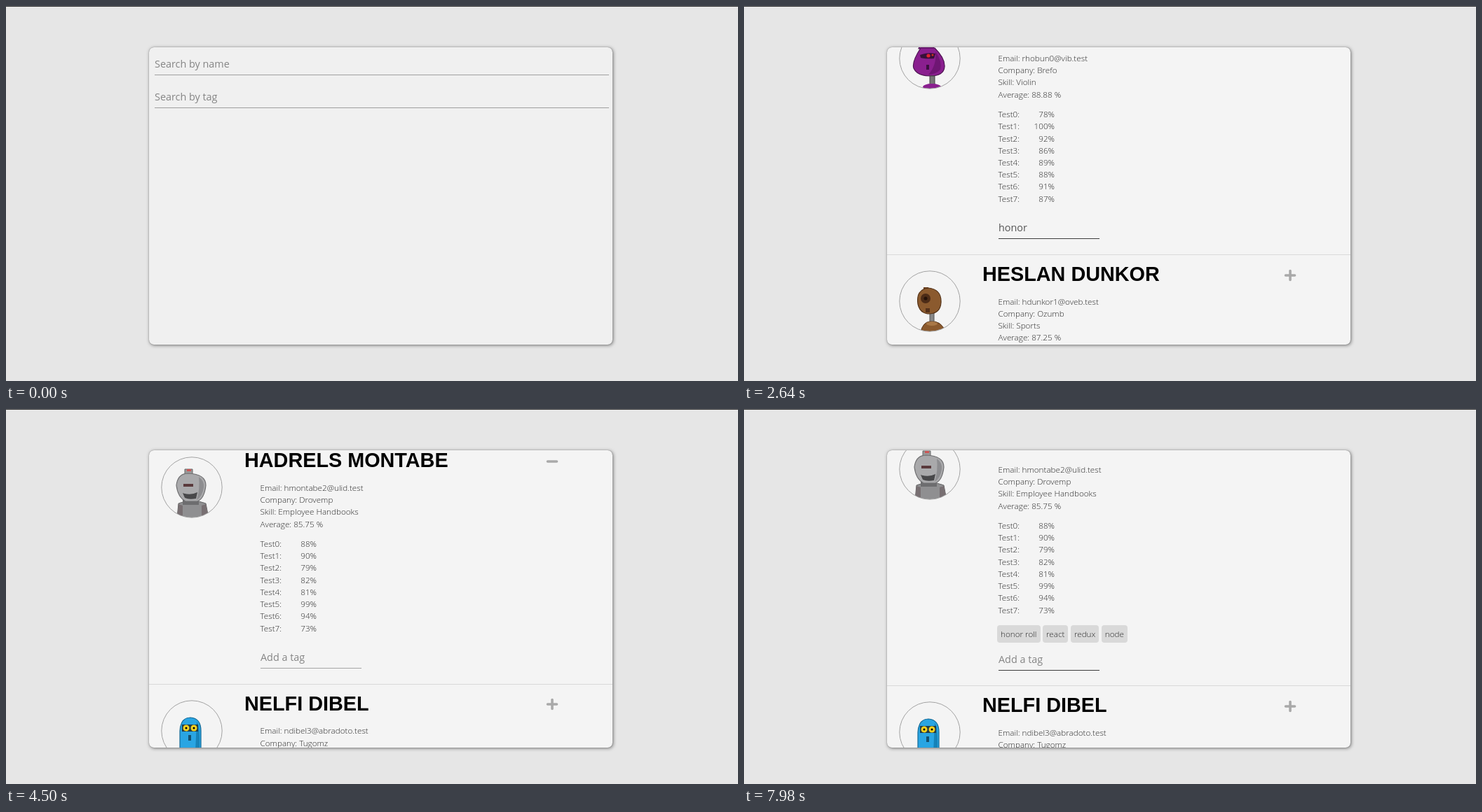
Recreate the animation shown at these times as an HTML page. Size 1044 by 536 pixels, loop 8 s.

```html
<!DOCTYPE html>
<html lang="en">
<head>
<meta charset="utf-8">
<title>Student search</title>
<style>
  html, body { margin: 0; width: 100%; height: 100%; overflow: hidden; background: #e6e6e6; }
  body { position: relative; font: 300 11.7px/17.2px "Open Sans", sans-serif; color: #2b2b2b; }
  #topline { position: absolute; top: 0; left: 0; right: 0; height: 1px; background: #333; }
  #panel { position: absolute; left: 204px; top: 59px; width: 660.5px; height: 424.5px;
    border-radius: 7px; overflow: hidden;
    box-shadow: 0 0 1px rgba(0,0,0,.45), 1px 1px 5px rgba(0,0,0,.5); }
  #page { position: absolute; inset: 0 0 auto; }
  #cards { position: absolute; top: 91.5px; left: 0; width: 100%; }
  .field { position: absolute; height: 31px; box-sizing: border-box; border-bottom: 1px solid #a0a0a0;
    font-size: 14.4px; font-weight: 400; line-height: 30px; white-space: pre; color: #555; }
  .field span { color: #858585; }
  .search { left: 8px; width: 648px; }
  .caret { position: absolute; top: 6px; width: 1px; height: 18px; background: #333; }
  .card { position: relative; box-shadow: 0 1px #d9d9d9; }
  .card > * { position: absolute; }
  .avatar { left: 16.5px; top: 23px; width: 88px; height: 88px; }
  h1 { left: 136px; top: 12px; margin: 0; color: #000; white-space: nowrap;
    font: bold 28.8px/33px "Liberation Sans", Arial, sans-serif; }
  .icon { left: 566px; top: 20.5px; width: 18px; height: 18px; }
  .info { left: 158.5px; top: 58.5px; white-space: pre; }
  .tests { left: 158.5px; top: 138.7px; width: 80.5px; }
  .tests div { display: flex; justify-content: space-between; }
  .tags { left: 157px; top: 289.5px; display: flex; gap: 3.5px; }
  .tags b { font-weight: 300; line-height: 25px; padding: 0 5px; border-radius: 4px; background: #d9d9d9; }
  .card .field { left: 159px; width: 143.5px; }
</style>
</head>
<body>
<svg width="0" height="0" style="position:absolute"><clipPath id="disc"><circle r="43"/></clipPath></svg>
<div id="topline"></div>
<div id="panel"><div id="page">
  <div class="field search" style="top:9px"><span>Search by name</span></div>
  <div class="field search" style="top:56px"><span>Search by tag</span></div>
  <div id="cards"></div>
</div></div>
<script>
const LOOP = 8000, STEP = 60;
const CLOSED = 137.4, OPEN = 347.5, TAG_ROW = 28.5;

const robots = {
  purple: `
    <g fill="#8a1f8f" stroke="#4d1552" stroke-width="1.2">
      <path d="M-10-27h10v8h-10zM-14-19h18l2 5h-22z"/>
      <path d="M-13-15Q-26 5-23 14Q-18 25 0 25Q20 25 21 12Q22 0 7-15Z"/>
    </g>
    <path d="M8-10Q18 4 15 16Q8 23-2 23Q10 10 8-10Z" fill="#6f1674"/>
    <path d="M-14-5Q-4-9 8-7L6 0Q-4 1-13-1Z" fill="#371039"/>
    <circle cx="-2" cy="-4" r="2.6" fill="#e3222f"/><circle cx="4" cy="-5" r="1.5" fill="#c32"/>
    <path d="M-5 9h4v7h-4z" fill="#3c1040"/>
    <path d="M0 25h7v13h-7z" fill="#777" stroke="#444"/>
    <ellipse cx="3" cy="41" rx="13" ry="5" fill="#8a1f8f"/>`,
  brown: `
    <path d="M-9-20h7v7h-7z" fill="#6b4020"/>
    <path d="M0 14h6v18h-6z" fill="#888" stroke="#555"/>
    <path d="M-2-19Q17-17 16 2Q15 17 0 18Q-14 18-17 4Q-20-17-2-19Z" fill="#8b5a2e" stroke="#55341a" stroke-width="1.2"/>
    <circle cx="-6" cy="-4" r="7" fill="#4d2c17"/><circle cx="-6" cy="-4" r="2.5" fill="#241109"/>
    <path d="M-6 10h6v6h-6z" fill="#55321b"/>
    <path d="M-13 44Q-10 30 0 29Q17 27 22 44Z" fill="#8b5a2e" stroke="#55341a"/>
    <ellipse cx="3" cy="32" rx="8" ry="3" fill="#a97847"/>`,
  gray: `
    <path d="M-21 44L-19 23Q0 15 20 23L24 44Z" fill="#8f8f91" stroke="#666"/>
    <path d="M-21 44l2-20 6 2v18zM24 44l-4-20-6 2v18z" fill="#786f72"/>
    <path d="M-10-26h11v8h-11z" fill="#999" stroke="#666"/><path d="M-7-26h6v3h-6z" fill="#c55"/>
    <path d="M-13 16h23v9h-23z" fill="#6d6d6f"/>
    <path d="M-5-20Q20-19 20-3Q18 16 8 20H-9Q-20 14-22-3Q-20-20-5-20Z" fill="#a9a9ab" stroke="#707072" stroke-width="1.2"/>
    <path d="M10-15Q18-9 17 0Q15 13 7 18Q12 2 10-15Z" fill="#8d8d90"/>
    <path d="M-12-5h14v4h-14z" fill="#5a3a3c"/>
    <path d="M-13 8Q-2 12 8 7L6 16Q-4 18-10 15Z" fill="#48484a"/>`,
  blue: `
    <path d="M-34 44Q-28 27-15 27H14Q29 27 35 44Z" fill="#1d9bd8" stroke="#166b97"/>
    <path d="M-17 34V0Q-16-19-2-19Q13-18 13 0V34Z" fill="#29a5e3" stroke="#166b97" stroke-width="1.2"/>
    <path d="M7-13Q12-8 11 30H5Z" fill="#1682b8"/>
    <ellipse cx="-1" cy="32" rx="20" ry="6" fill="#2aa6e2" stroke="#166b97"/>
    <path d="M-14-9H9V1H-14Z" fill="#233c48"/>
    <circle cx="-8" cy="-4" r="4.5" fill="#f3d21f"/><circle cx="3" cy="-4" r="4.5" fill="#f3d21f"/>
    <circle cx="-8" cy="-4" r="1.5"/><circle cx="3" cy="-4" r="1.5"/>
    <path d="M-5 6h4v8h-4z" fill="#14506f"/>`
};

const students = [
  { name: 'RONADIBE HOBUN', email: 'rhobun0@vib.test', company: 'Brefo', skill: 'Violin', average: '88.88',
    robot: 'purple', scores: [78, 100, 92, 86, 89, 88, 91, 87], opens: 1080, focus: 1800, blur: 4260 },
  { name: 'HESLAN DUNKOR', email: 'hdunkor1@oveb.test', company: 'Ozumb', skill: 'Sports', average: '87.25', robot: 'brown' },
  { name: 'HADRELS MONTABE', email: 'hmontabe2@ulid.test', company: 'Drovemp', skill: 'Employee Handbooks', average: '85.75',
    robot: 'gray', scores: [88, 90, 79, 82, 81, 99, 94, 73], opens: 4260, focus: 4740, blur: LOOP },
  { name: 'NELFI DIBEL', email: 'ndibel3@abradoto.test', company: 'Tugomz', skill: 'Nutrition Education', average: '84.50', robot: 'blue' },
  { name: 'JOLVA GREMUND', email: 'jgremund4@ovik.test', company: 'Plirbo', skill: 'Painting', average: '86.13', robot: 'gray' }
];

// One key time per typed character, then the time of Enter.
const entries = [
  { card: 0, text: 'honor roll', keys: [2160, 2160, 2220, 2340, 2400, 2700, 2760, 2820, 2880, 2940], enter: 3120 },
  { card: 2, text: 'honor roll', keys: [4980, 5040, 5040, 5100, 5160, 5340, 5340, 5400, 5460, 5520], enter: 5760 },
  { card: 2, text: 'react', keys: [5940, 6000, 6060, 6180, 6240], enter: 6300 },
  { card: 2, text: 'redux', keys: [6480, 6540, 6600, 6720, 6780], enter: 7080 },
  { card: 2, text: 'node', keys: [7260, 7320, 7380, 7500], enter: 7740 }
];
const caretOff = [[2640, 2700], [3360, 4260], [7980, LOOP]];
const scrollPath = [[1320, 0], [1380, 47], [1500, 127], [1560, 143], [3480, 143], [3960, 427.5],
  [4200, 573], [4380, 573], [4440, 592], [4500, 618.5], [4560, 644.5]];

const cardsBox = document.getElementById('cards');
cardsBox.innerHTML = students.map(s => `
  <div class="card">
    <svg class="avatar" viewBox="-44 -44 88 88">
      <g clip-path="url(#disc)">${robots[s.robot]}</g>
      <circle r="43.2" fill="none" stroke="#999" stroke-width=".9"/>
    </svg>
    <h1>${s.name}</h1>
    <svg class="icon" viewBox="-9 -9 18 18" stroke="#a9a9a9" stroke-width="3.6" stroke-linecap="round">
      <path d="M-6.5 0H6.5"/><path class="bar" d="M0-6.5V6.5"/>
    </svg>
    <div class="info">Email: ${s.email}\nCompany: ${s.company}\nSkill: ${s.skill}\nAverage: ${s.average} %</div>
    ${s.scores ? `<div class="tests">${s.scores.map((n, i) => `<div><span>Test${i}:</span><span>${n}%</span></div>`).join('')}</div>
    <div class="tags"></div><div class="field"></div>` : ''}
  </div>`).join('');
const cards = [...cardsBox.children];
const page = document.getElementById('page');
const panel = document.getElementById('panel');
const avatars = document.querySelectorAll('.avatar g');

function along(path, t) {
  const i = path.findIndex(p => p[0] > t);
  if (i === 0) return path[0][1];
  if (i < 0) return path[path.length - 1][1];
  const [t0, a] = path[i - 1], [t1, b] = path[i];
  return a + (b - a) * (t - t0) / (t1 - t0);
}

function setHtml(node, html) {
  if (node.shown !== html) node.innerHTML = node.shown = html;
}

function drawCard(student, card, index, t) {
  const open = t >= student.opens;
  const mine = entries.filter(e => e.card === index);
  const tags = mine.filter(e => t >= e.enter);
  const shift = tags.length ? TAG_ROW : 0;
  card.style.height = (open ? OPEN + shift : CLOSED) + 'px';
  card.querySelector('.bar').style.display = open ? 'none' : '';
  if (!student.scores) return;

  const [tests, tagRow, field] = ['.tests', '.tags', '.field'].map(q => card.querySelector(q));
  for (const part of [tests, tagRow, field]) part.style.visibility = open ? '' : 'hidden';
  setHtml(tagRow, tags.map(e => `<b>${e.text}</b>`).join(''));

  const entry = mine.find(e => t < e.enter);
  const typed = entry ? entry.text.slice(0, entry.keys.filter(k => k <= t).length) : '';
  const focused = t >= student.focus && t < student.blur;
  const caret = focused && !caretOff.some(([a, b]) => t >= a && t < b) ? '<i class="caret"></i>' : '';
  setHtml(field, typed + caret + (typed ? '' : '<span>Add a tag</span>'));
  field.style.top = 294.7 + shift + 'px';
  const shade = focused ? along([[student.focus - STEP, 165], [student.focus + 180, 60]], t) : 165;
  field.style.borderColor = `rgb(${shade},${shade},${shade})`;
}

function draw(now) {
  const t = Math.floor(now % LOOP / STEP) * STEP;
  const loaded = t >= 120;
  panel.style.background = loaded ? '#f4f4f4' : '#f0f0f0';
  cardsBox.style.display = loaded ? '' : 'none';
  avatars.forEach(a => a.style.display = t >= 180 ? '' : 'none');
  students.forEach((s, i) => drawCard(s, cards[i], i, t));
  page.style.top = -along(scrollPath, t) + 'px';
}

const start = performance.now();
function tick() {
  draw(performance.now() - start);
  requestAnimationFrame(tick);
}
tick();
</script>
</body>
</html>
```
